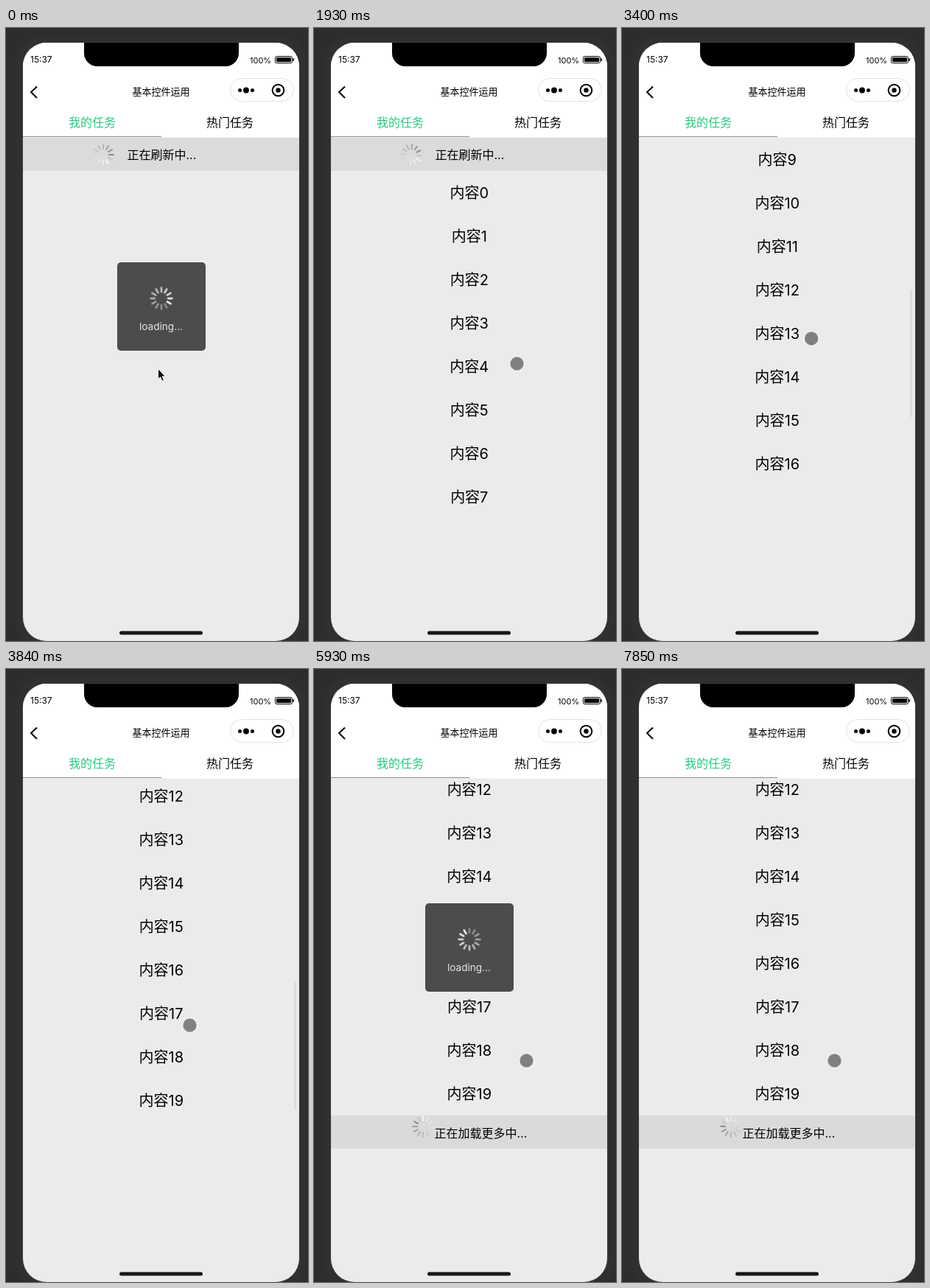
These frames come from a looping animation (410 px wide and 832 px high, 8000 ms). An HTML page:

```html
<!DOCTYPE html>
<html lang="zh-CN">
<head>
<meta charset="utf-8">
<title>基本控件运用</title>
<style>
  html, body { margin: 0; width: 100%; height: 100%; overflow: hidden; background: #2d2d2d; }
  svg { display: block; width: 410px; height: 832px; }
  text { font-family: Inter, "Noto Sans CJK SC", "Noto Sans CJK", sans-serif; font-size: 16px; }
  .mid { text-anchor: middle; }
  .row { font-size: 20px; }

  .cut { animation: 8s step-end infinite; }
  .move { animation: 8s linear infinite; }

  /* Refresh, toast and load-more states switch without transitions */
  #refresh { animation-name: refresh; }
  @keyframes refresh { 0% { opacity: 1 } 31.5%, 100% { opacity: 0 } }
  #toast { animation-name: toast; }
  @keyframes toast { 0% { opacity: 1 } 22.25% { opacity: 0 } 63.75% { opacity: 1 } 83.4%, 100% { opacity: 0 } }
  .first { animation-name: first; }
  @keyframes first { 0% { opacity: 1 } 50%, 100% { opacity: 0 } }
  .second { animation-name: second; }
  @keyframes second { 0% { opacity: 0 } 50%, 100% { opacity: 1 } }
  #hint { animation-name: hint; }
  @keyframes hint { 0% { opacity: 1 } 63.75%, 100% { opacity: 0 } }
  #more { animation-name: more; }
  @keyframes more { 0% { opacity: 0 } 63.75%, 100% { opacity: 1 } }

  /* List */
  #list { animation-name: list; }
  @keyframes list {
    0% { opacity: 0; transform: translateY(45px) }
    22.25% { opacity: 1; transform: translateY(45px) }
    31.5%, 100% { opacity: 1; transform: none }
  }
  #rows { animation-name: scroll; }
  @keyframes scroll {
    0%, 35.4% { transform: none }
    39.1% { transform: translateY(-215px) }
    42.5% { transform: translateY(-530px) }
    44.4% { transform: translateY(-660px) }
    46.9%, 54.4% { transform: translateY(-714px) }
    55.5%, 100% { transform: translateY(-723px) }
  }
  #thumb { animation-name: thumb; }
  @keyframes thumb {
    0%, 31.4% { opacity: 0; transform: none }
    31.5%, 35.4% { opacity: 1; transform: none }
    39.1% { transform: translateY(82px) }
    42.5% { transform: translateY(202px) }
    44.4% { transform: translateY(251px) }
    46.9%, 54.4% { opacity: 1; transform: translateY(272px) }
    58%, 100% { opacity: 0; transform: translateY(272px) }
  }
  .pull { animation-name: pull; }
  @keyframes pull {
    0%, 54.4% { height: 0 }
    59.25% { height: 51px }
    61.125%, 62.5% { height: 72px }
    63.75%, 100% { height: 45px }
  }

  /* Pointer */
  #pointer { animation-name: point; }
  @keyframes point {
    0%, 3.7% { transform: translate(210px, 470px) }
    11.2%, 30.6% { transform: translate(275.5px, 455.5px) }
    33.25% { transform: translate(279.5px, 516.5px) }
    35.4% { transform: translate(286px, 545px) }
    39.1% { transform: translate(270px, 330px) }
    44.4% { transform: translate(250px, 472px) }
    48%, 54.4% { transform: translate(249.5px, 483.5px) }
    59.25% { transform: translate(249.5px, 328px) }
    61.125%, 63.75% { transform: translate(249.5px, 262.5px) }
    71.5%, 100% { transform: translate(288.5px, 531.5px) }
  }
  #arrow { animation-name: arrow; }
  @keyframes arrow { 0% { opacity: 1 } 5.6%, 100% { opacity: 0 } }
  #touch { animation-name: touch; }
  @keyframes touch { 0% { opacity: 0 } 5.6%, 100% { opacity: 1 } }

  .spin { animation: spin 1s linear infinite; stroke-linecap: round; }
  .tick { animation-timing-function: steps(12); }
  @keyframes spin { to { transform: rotate(360deg) } }
</style>
</head>
<body>
<svg viewBox="0 0 410 832">
  <defs>
    <clipPath id="screen"><rect x="23" y="20" width="375" height="812" rx="32"/></clipPath>
    <clipPath id="view"><rect x="23" y="148" width="375" height="468"/></clipPath>
    <clipPath id="page"><rect x="23" y="148" width="375" height="684"/></clipPath>
    <clipPath id="footClip"><rect class="move pull" x="23" y="606" width="375"/></clipPath>
  </defs>

  <rect width="410" height="832" fill="#2d2d2d"/>
  <rect x="12" y="9" width="397" height="834" rx="43" fill="#303030"/>
  <rect x="22" y="19" width="377" height="814" rx="33" fill="#3b3b3b"/>

  <g clip-path="url(#screen)">
    <rect x="23" y="20" width="375" height="812" fill="#ebebeb"/>

    <g clip-path="url(#page)">
      <g id="list" class="cut">
        <g clip-path="url(#view)"><g id="rows" class="move"></g></g>
      </g>
    </g>
    <rect id="thumb" class="move" x="391" y="153" width="3" height="173" rx="1.5" fill="#dcdcdc"/>

    <g id="refresh" class="cut">
      <rect x="23" y="149" width="375" height="45" fill="#dbdbdb"/>
      <g transform="translate(132 172)"><g class="spin gray" style="animation-delay:-.25s"></g></g>
      <text x="164.5" y="178">正在刷新中...</text>
    </g>

    <g clip-path="url(#footClip)">
      <rect x="23" y="606" width="375" height="72" fill="#dadada"/>
      <g id="hint" class="cut">
        <path d="M162 634V607.5M152.5 616.5l9.5-9 9.5 9" fill="none" stroke="#9a9a9a" stroke-width="1.4"/>
        <text x="177.5" y="636">上拉加载更多</text>
      </g>
      <g id="more" class="cut">
        <g transform="translate(148 621)"><g class="spin gray" style="animation-delay:-.903s"></g></g>
        <text x="163.5" y="636">正在加载更多中...</text>
      </g>
    </g>

    <!-- Status bar, title bar and tabs -->
    <rect x="23" y="20" width="375" height="128.5" fill="#fff"/>
    <path d="M106 20h210v14a18 18 0 0 1-18 18H124a18 18 0 0 1-18-18z"/>
    <text x="33" y="47" style="font-size:12px">15:37</text>
    <text x="331" y="48" style="font-size:11px">100%</text>
    <rect x="365.5" y="38.5" width="23" height="9" rx="2" fill="none" stroke="#000"/>
    <rect x="367" y="40" width="20" height="6" rx=".8"/>
    <rect x="389.5" y="41" width="1.5" height="4" rx=".7"/>
    <path d="M42 79.5L34 87l8 8" fill="none" stroke="#000" stroke-width="2"/>
    <text class="mid" x="210.5" y="91" style="font-size:13px">基本控件运用</text>
    <rect x="304.5" y="68.5" width="86" height="31" rx="15.5" fill="#fff" stroke="#e2e2e2"/>
    <circle cx="317.5" cy="84.5" r="2.5"/>
    <circle cx="326" cy="84.5" r="3.9"/>
    <circle cx="334.5" cy="84.5" r="2.5"/>
    <circle cx="369.5" cy="84.5" r="7.8" fill="none" stroke="#000" stroke-width="2"/>
    <circle cx="369.5" cy="84.5" r="3.2"/>
    <text class="mid" x="117" y="134" fill="#26cb7f">我的任务</text>
    <text class="mid" x="304" y="134">热门任务</text>
    <rect x="23" y="147" width="188" height="1" fill="#8c8c8c"/>

    <g id="toast" class="cut">
      <rect x="151" y="318" width="120" height="120" rx="5" fill="#4c4c4c"/>
      <g transform="translate(211 367)">
        <g class="cut first"><g class="spin tick light" style="animation-delay:-.34s"></g></g>
        <g class="cut second"><g class="spin tick light"></g></g>
      </g>
      <text class="mid" x="210.5" y="410" fill="#e6e6e6" style="font-size:13.6px">loading...</text>
    </g>

    <rect x="154" y="818.5" width="113" height="5" rx="2.5" fill="#17171a"/>
  </g>

  <g id="pointer" class="move">
    <path id="arrow" class="cut" d="M-3.5-7.5V6.5L-.4 3.7 2 9.3 4.4 8.2 2 2.9H6.3z" stroke="#fff" stroke-width="1"/>
    <circle id="touch" class="cut" r="10" fill="#808080" stroke="#f8f8f8" stroke-width="1.5"/>
  </g>
</svg>
<script>
  const add = (parent, tag, attrs, text = '') => {
    const node = document.createElementNS(parent.namespaceURI, tag);
    for (const name in attrs) node.setAttribute(name, attrs[name]);
    node.textContent = text;
    parent.append(node);
  };

  const rows = document.getElementById('rows');
  for (let i = 0; i < 20; i++) {
    add(rows, 'text', { class: 'mid row', x: 210.8, y: 186.3 + 59 * i }, '内容' + i);
  }

  // Twelve blades, clockwise from the leading one
  const blades = (selector, from, to, width, color) => {
    for (const spinner of document.querySelectorAll(selector)) {
      for (let i = 0; i < 12; i++) {
        add(spinner, 'line', {
          y1: -from, y2: -to, transform: `rotate(${30 * i})`,
          stroke: color(i), 'stroke-width': width
        });
      }
    }
  };
  const gray = i => {
    const v = i === 0 ? 122 : i === 1 ? 192 : i < 6 ? 250 - 8 * (i - 2) : 212 - 15 * (i - 6);
    return `rgb(${v},${v},${v})`;
  };
  const light = i => `rgba(255,255,255,${i ? 0.32 + 0.052 * i : 0.95})`;
  blades('.gray', 8, 14, 1.7, gray);
  blades('.light', 9, 14.5, 2.5, light);
</script>
</body>
</html>
```
